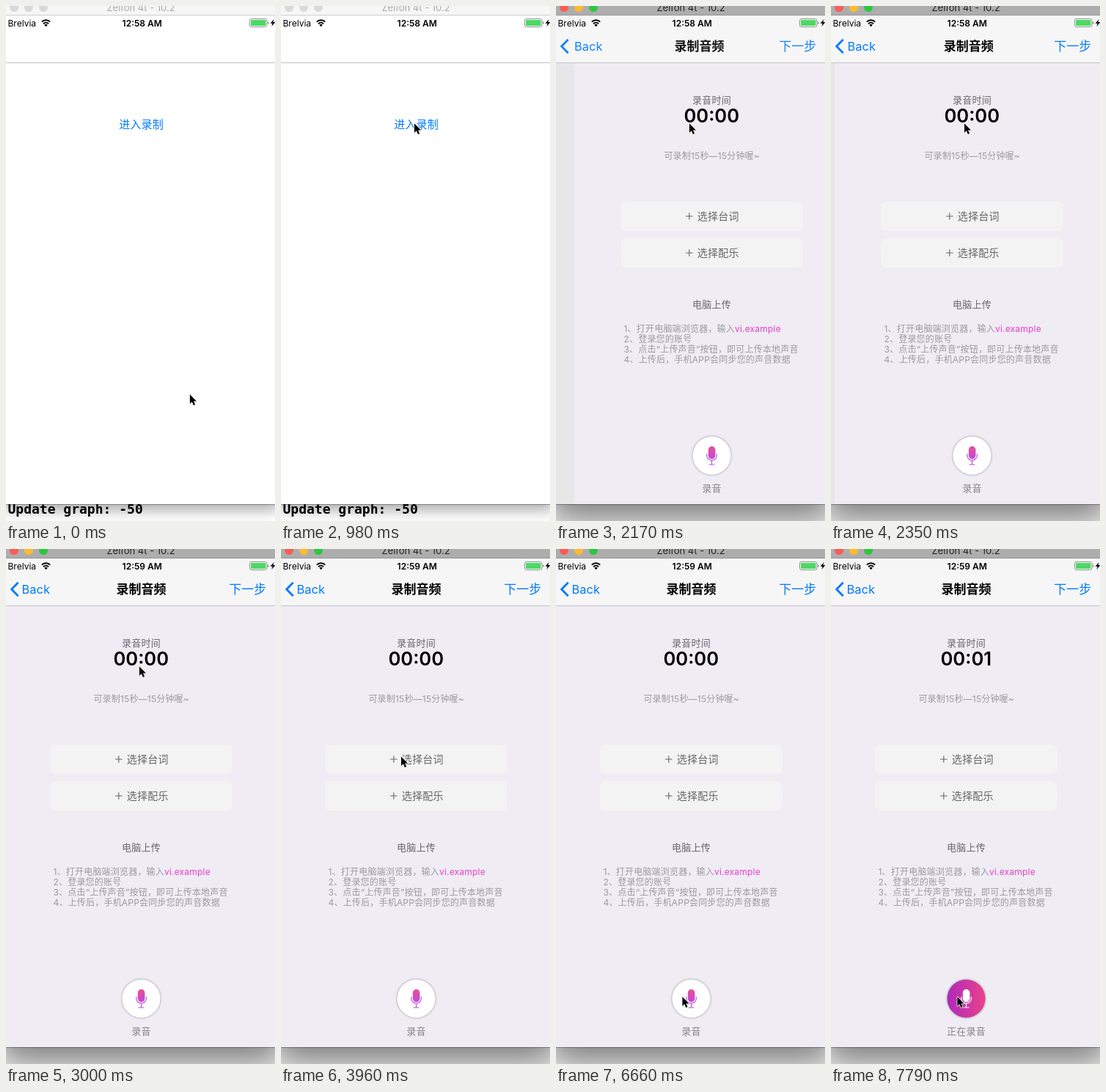
Animation of 367 by 703 pixels, one loop 8000 ms. Source, as an HTML page:

```html
<!DOCTYPE html>
<html lang="zh-CN">
<head>
<meta charset="utf-8">
<title>Recorder</title>
<style>
html, body { margin: 0; width: 100%; height: 100%; overflow: hidden; background: #fff; }
svg { display: block; width: 367px; height: 703px; }
text { font-family: Inter, "Noto Sans CJK SC", "Noto Sans CJK", sans-serif; }
.mid { text-anchor: middle; }
.mono { font: bold 18px "DejaVu Sans Mono", monospace; }
.s12 { font-size: 12px; letter-spacing: .2px; fill: #9c9a9f; }
.s13 { font-size: 13px; letter-spacing: .2px; fill: #69676c; }
.s14 { font-size: 14px; letter-spacing: .2px; fill: #666; }
.s15 { font-size: 15px; letter-spacing: .15px; }
.s17 { font-size: 17px; }
.blue { fill: #007aff; }
.line { fill: none; stroke-linecap: round; }
</style>
</head>
<body>
<svg viewBox="0 0 367 703">
  <defs>
    <filter id="soft" x="-30%" y="-30%" width="160%" height="160%"><feGaussianBlur stdDeviation="24"/></filter>
    <filter id="faint" x="-30%" y="-30%" width="160%" height="160%"><feGaussianBlur stdDeviation="10"/></filter>
    <filter id="halo" x="-30%" y="-30%" width="160%" height="160%"><feGaussianBlur stdDeviation="1.2"/></filter>
    <linearGradient id="micInk" gradientUnits="userSpaceOnUse" x1="180" y1="602" x2="189" y2="624">
      <stop stop-color="#ee4f92"/><stop offset=".75" stop-color="#bd49dc"/><stop offset="1" stop-color="#b04ade"/>
    </linearGradient>
    <linearGradient id="recInk"><stop stop-color="#ad2abb"/><stop offset="1" stop-color="#ea428a"/></linearGradient>
    <clipPath id="screen"><path d="M-3 13H372V680H-3z"/></clipPath>
  </defs>

  <rect width="367" height="703" fill="#fff"/>
  <rect id="shadowOff" x="-3" y="8" width="375" height="680" opacity=".34" filter="url(#faint)"/>
  <rect id="shadowOn" x="-11" y="24" width="391" height="680" opacity=".5" filter="url(#soft)"/>
  <text id="log" class="mono" x="2.5" y="693">Update graph: -50</text>

  <rect id="bar" x="-3" y="-10" width="375" height="23"/>
  <rect id="barLine" x="-3" y="12" width="375" height="1"/>
  <g id="lights"><circle cx="11" cy="2" r="6"/><circle cx="31" cy="2" r="6"/><circle cx="51" cy="2" r="6"/></g>
  <text id="device" class="mid" x="184" y="7" font-size="13">Zelfon 4t - 10.2</text>

  <g clip-path="url(#screen)">
    <rect x="-3" y="13" width="375" height="667" fill="#fff"/>
    <g id="home">
      <text id="enter" class="mid s15 blue" x="184.5" y="166.5">进入录制</text>
    </g>
    <rect id="dim" x="-3" y="78" width="375" height="602" opacity="0"/>

    <g id="page">
      <rect x="-3" y="78" width="375" height="602" fill="#efecf4"/>
      <text class="mid s13" x="184.5" y="132.7">录音时间</text>
      <text id="timer" class="mid" x="184.3" y="159" font-size="25.6" font-weight="600">00:00</text>
      <text class="mid s12" x="184.7" y="209.3">可录制15秒—15分钟喔~</text>
      <g fill="#f3f3f3">
        <rect x="60" y="267" width="249" height="40" rx="8"/>
        <rect x="60" y="317" width="249" height="40" rx="8"/>
      </g>
      <path d="M149 287h9.6M153.8 282.2v9.6M149 337h9.6M153.8 332.2v9.6" stroke="#666" stroke-width="1.1"/>
      <text class="s14" x="164.8" y="292.3">选择台词</text>
      <text class="s14" x="164.8" y="342.3">选择配乐</text>
      <text class="mid s13" x="184.5" y="412">电脑上传</text>
      <text class="s12" x="64.5" y="444.9">1、打开电脑端浏览器，输入<tspan fill="#e83fc9">vi.example</tspan></text>
      <text class="s12" x="64.5" y="458.9">2、登录您的账号</text>
      <text class="s12" x="64.5" y="472.9">3、点击“上传声音”按钮，即可上传本地声音</text>
      <text class="s12" x="64.5" y="486.9">4、上传后，手机APP会同步您的声音数据</text>
      <circle cx="184.5" cy="613.7" r="27" fill="#77757c" opacity=".42" filter="url(#halo)"/>
      <circle id="disc" cx="184.5" cy="613.7" r="26"/>
      <g id="mic">
        <rect x="179.8" y="601" width="9.6" height="17.4" rx="4.8"/>
        <path class="line" d="M177.8 611.5v2a6.75 6.75 0 0 0 13.5 0v-2M184.5 620.4v5.4M181 626h7" stroke-width="1.2"/>
      </g>
      <text id="state" class="mid s13" x="184.5" y="662.7" style="fill:#858389">录音</text>
    </g>

    <rect x="-3" y="13" width="375" height="64" fill="#fff"/>
    <rect id="navTint" x="-3" y="13" width="375" height="64" fill="#f6f6f6"/>
    <rect x="-3" y="77" width="375" height="1" fill="#c4c3c6"/>
    <g id="nav">
      <path class="line" d="M16.6 45.8L7.6 55L16.6 64.2" stroke="#007aff" stroke-width="2.8" style="stroke-linecap:butt"/>
      <text id="back" class="blue" x="21.6" y="61" font-size="16.4">Back</text>
      <text id="title" class="mid s17" x="184.6" y="61.3" font-weight="700">录制音频</text>
      <text class="s17 blue" x="304.3" y="61.3">下一步</text>
    </g>

    <text x="2.5" y="27.6" font-size="12">Brelvia</text>
    <path class="line" d="M48.8 21.6a8.2 8.2 0 0 1 11.4 0M51 24.2a5.1 5.1 0 0 1 7 0" stroke="#000" stroke-width="2" style="stroke-linecap:butt"/>
    <path d="M54.5 28.2l-2.2-2.4a3.2 3.2 0 0 1 4.4 0z"/>
    <text id="clock" class="mid" x="185.7" y="27.6" font-size="12" font-weight="600">12:58 AM</text>
    <rect x="332.5" y="17.5" width="23.5" height="11" rx="2.5" fill="#fff" stroke="#8e8e93"/>
    <rect x="334" y="19" width="20.5" height="8" rx="1" fill="#4cd964"/>
    <path d="M357 21.2q1.6.3 1.6 1.8t-1.6 1.8z" fill="#8e8e93"/>
    <path d="M365.6 18l-5 5.8h3l-1.2 4.2l5-5.9h-3z"/>
  </g>
  <rect x="-3" y="680" width="375" height="1" opacity=".32"/>

  <g id="cursor">
    <g transform="translate(.4 .8) scale(.88)">
      <path d="M.4 1.2v14l3.1-3 2.4 5.2 2.6-1.1-2.3-5h4.2z" opacity=".2" stroke="#000"/>
      <path d="M0 0v14.4l3.2-3 2.4 5.4 2.6-1.1-2.4-5.2h4.5z" stroke="#fff" stroke-width="1.6" paint-order="stroke" stroke-linejoin="round"/>
    </g>
  </g>
</svg>
<script>
const LOOP = 8000, WIDTH = 375;
const $ = id => document.getElementById(id);
const set = (id, attrs) => { for (const k in attrs) $(id).setAttribute(k, attrs[k]); };
const label = (id, s) => { if ($(id).textContent !== s) $(id).textContent = s; };
const shift = (id, x, y = 0) => set(id, { transform: `translate(${x} ${y})` });

// Pointer moves: first step, last step, number of steps, path points
const moves = [
  [0, 0, 1, [[250.5, 529.5]]],
  [530, 620, 2, [[242, 320], [234.5, 156]]],
  [860, 980, 3, [[215, 157], [192, 159], [181.5, 159.5]]],
  [3440, 3620, 4, [[180, 176], [175, 210], [169, 246], [167, 262.5]]],
  [3850, 3960, 3, [[166, 268], [164.5, 277], [163.5, 282.5]]],
  [5760, 6550, 14, [[163.8, 318.5], [162, 385], [161.5, 480], [164, 575], [168, 633], [170, 631], [171, 622]]],
  [6610, 6660, 2, [[171.5, 615], [172, 610.5]]]
];

// Page offset while it slides in: time, distance still to go
const slide = [[0, WIDTH], [2000, 290], [2060, 142], [2110, 68], [2170, 28], [2260, 8], [2430, 0]];

const latest = (table, t) => table.filter(row => row[0] <= t).pop();

function pointer(t) {
  const [from, to, steps, pts] = latest(moves, t);
  if (steps < 2) return pts[0];
  const step = Math.min(steps - 1, Math.floor((t - from) / (to - from) * (steps - 1)));
  const at = step / (steps - 1) * (pts.length - 1);
  const i = Math.min(pts.length - 2, Math.floor(at)), u = at - i;
  return pts[i].map((v, k) => v + (pts[i + 1][k] - v) * u);
}

function draw(t) {
  const active = t >= 1820, pushed = t >= 2000, pressed = t >= 6720, recording = t >= 6840;
  const away = latest(slide, t)[1], shown = 1 - away / WIDTH;

  set('shadowOff', { visibility: active ? 'hidden' : 'visible' });
  set('shadowOn', { visibility: active ? 'visible' : 'hidden' });
  set('log', { visibility: pushed ? 'hidden' : 'visible' });
  set('bar', { fill: active ? '#adadad' : '#f6f6f6' });
  set('barLine', { fill: active ? '#989898' : '#cfcfcf' });
  set('device', { fill: active ? '#222' : '#aaa' });
  const hues = active ? ['#fc5b57', '#fdbc2e', '#2ac840'] : ['#d9d9d9', '#d9d9d9', '#d9d9d9'];
  [...$('lights').children].forEach((c, i) => c.setAttribute('fill', hues[i]));

  set('enter', { opacity: active ? .2 : 1 });
  shift('home', -.3 * WIDTH * shown);
  set('dim', { opacity: .1 * shown });
  shift('page', away);
  set('navTint', { opacity: shown });
  set('nav', { opacity: shown });
  shift('title', away * .39);
  shift('back', away * .125);

  label('clock', t >= 3000 ? '12:59 AM' : '12:58 AM');
  label('timer', t >= 7790 ? '00:01' : '00:00');
  label('state', recording ? '正在录音' : '录音');
  set('disc', { fill: recording ? 'url(#recInk)' : pressed ? '#e4e2e6' : '#fff' });
  set('mic', { fill: recording ? '#fff' : 'url(#micInk)' });
  $('mic').lastElementChild.setAttribute('stroke', recording ? '#fff' : '#b951da');

  shift('cursor', ...pointer(t));
}

const start = performance.now();
function tick() {
  draw((performance.now() - start) % LOOP);
  requestAnimationFrame(tick);
}
tick();
</script>
</body>
</html>
```
